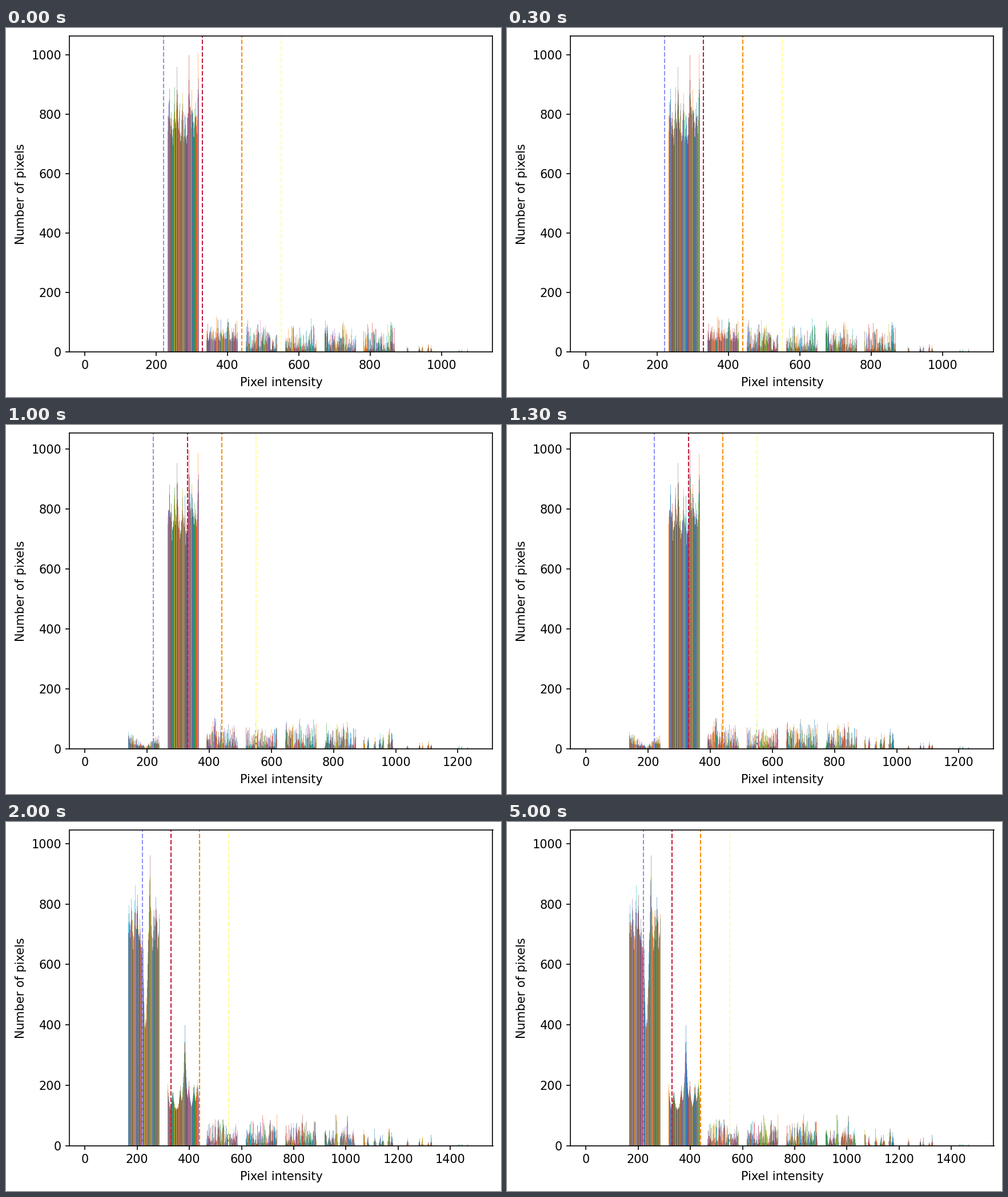
A matplotlib script that plays this animation: 867 by 646 pixels, repeating every 7000 ms.

```python
import numpy as np
import matplotlib.pyplot as plt
from matplotlib.animation import FuncAnimation
from matplotlib.colors import to_rgb

W, H, DPI = 867, 646, 128          # a power of two keeps the pixel size exact
S = 149.4 / DPI                    # scale of point sizes
AX_W, AX_H, AX_BOTTOM = 741, 552.6, 79.1
BIN = AX_W / 10.78                 # pixels per histogram bin
GROUP = 55                         # pixels per group of bars (0.8 bin)
SUB = np.arange(2 * GROUP) / 2     # half-pixel columns within a group
TAB10 = np.array([to_rgb(f"C{i}") for i in range(10)])
THRESHOLDS = {220: "#9191f8", 330: "#c01a3c", 440: "#fa8c05", 550: "#ffff99"}

plt.rcParams.update({
    "font.family": "DejaVu Sans", "font.size": 10 * S,
    "axes.linewidth": 0.8 * S, "axes.labelpad": 4 * S,
    "xtick.major.size": 3.5 * S, "ytick.major.size": 3.5 * S,
    "xtick.major.width": 0.8 * S, "ytick.major.width": 0.8 * S,
    "xtick.major.pad": 3.5 * S, "ytick.major.pad": 3.5 * S,
})


def tower(base, peaks, dip=0.0, spread=1.6):
    """Tall group: a rippled base with sharp peaks and an optional valley."""
    def make(rng):
        h = base * (1.04 + 0.09 * np.sin(1.3 * SUB))
        h *= rng.uniform(0.93, 1.07, SUB.size)
        for x, top in peaks:
            rise = np.exp(-np.abs(SUB - x) / spread)
            h = np.maximum(h, base + (top - base) * rise)
        h *= 1 - 0.06 * rng.random(SUB.size) ** 2
        return h * (1 - dip * np.exp(-((SUB - 30) / 3.5) ** 2))
    return make


def dense(low=6, high=118):
    """Low group of irregular spikes."""
    def make(rng):
        swell = np.interp(SUB, np.linspace(0, GROUP, 23), rng.uniform(0.35, 1, 23))
        return low + (high - low) * swell * rng.random(SUB.size) ** 1.2
    return make


def sparse(index):
    """Thinning group: fewer and lower clusters towards the last bin."""
    places = [44.5, 29, 34, 49.5, 8, 20, 1, 14, 40]
    rest = 10 - index

    def make(rng):
        h = np.zeros(SUB.size)
        for x in places[:2 * rest + 1]:
            top = 14.5 * rest ** 1.5 * rng.uniform(0.5, 1)
            bump = np.clip(1.2 - np.abs(SUB - x) / (0.4 + 0.6 * rest), 0, 1)
            h = np.maximum(h, top * bump * rng.uniform(0.3, 1, SUB.size))
        return h
    return make


def fading(start):
    """Low group that falls to almost nothing and partly returns."""
    def make(rng):
        base = start * np.abs(1 - SUB / 30) ** 0.8 + 5
        return base * rng.uniform(0.3, 1, SUB.size)
    return make


def scene(bin_width, top, groups, thin, left=111.5, y_step=200):
    low = {i: sparse(i) if i >= thin else dense() for i in range(3, 10)}
    return dict(bin=bin_width, top=top, left=left, y_step=y_step, groups={**low, **groups})


SKYLINE = tower(715, [(3, 900), (12, 900), (16.5, 960), (26, 890), (37.5, 1000),
                      (42.5, 905), (47.5, 830), (53.5, 1005)])

SCENES = [
    scene(110.1, 1062.6, {2: SKYLINE, 3: dense(35, 140)}, thin=8),
    scene(126.7, 1065, {1: fading(38), 2: SKYLINE}, thin=7),
    scene(126.3, 1053.4, {1: fading(55), 2: SKYLINE}, thin=7),
    scene(140.6, 753.2, {
        1: tower(410, [(0, 535), (4.5, 583), (11.5, 643), (17.5, 588), (37.5, 567),
                       (48.5, 550), (53, 540)], dip=0.62),
        2: tower(335, [(4, 417), (25, 560), (27, 717), (31.5, 625), (38.5, 497),
                       (43, 440), (51, 447), (54.5, 465)])},
        thin=6, left=98, y_step=100),
    scene(150.4, 1044.5, {
        1: tower(665, [(1.5, 810), (5.5, 835), (12, 870), (16, 845), (38, 987),
                       (48, 825), (54.5, 785)], dip=0.45),
        2: tower(112, [(0, 205), (9, 190), (22, 200), (30, 400), (37, 215),
                       (46, 210), (52, 228)], spread=2.8)},
        thin=6),
]


def group_colors(index):
    """Colours belong to a column, so they stay the same in every scene."""
    rng = np.random.default_rng(index)
    return TAB10[(10 * rng.random(SUB.size) ** 1.4).astype(int)]


def draw_bars(ax, index, heights, zero, unit):
    """Merge pairs of half-pixel bars into one-pixel columns."""
    start = round(zero + BIN * (index + 0.1))
    x = (start + np.arange(GROUP) + 0.2 - zero) / unit
    pairs = heights.reshape(GROUP, 2)
    tints = group_colors(index).reshape(GROUP, 2, 3)
    taller = tints[np.arange(GROUP), pairs.argmax(axis=1)]
    layers = ((pairs.max(axis=1), (taller + 1) / 2),
              (pairs.min(axis=1), tints.mean(axis=1)))
    for tops, shades in layers:
        shown = tops > 0
        ax.vlines(x[shown], 0, tops[shown], colors=shades[shown],
                  linewidth=72 / DPI, snap=True, zorder=1)


fig = plt.figure(figsize=(W / DPI, H / DPI), dpi=DPI, facecolor="white")
ax = fig.add_axes([0.1, 0.1, 0.8, 0.8])


def update(frame):
    number = min(frame, len(SCENES) - 1)
    now = SCENES[number]
    left, width = now["left"], now["bin"]
    zero, unit = left + 0.39 * BIN, BIN / width
    rng = np.random.default_rng(20 + number)

    ax.clear()
    ax.set_position([left / W, AX_BOTTOM / H, AX_W / W, AX_H / H])
    for index, make in now["groups"].items():
        draw_bars(ax, index, make(rng), zero, unit)
    for value, color in THRESHOLDS.items():
        ax.axvline(value, color=color, linestyle="--", linewidth=S)

    ax.set_xticks(np.arange(0, 10.39 * width, 200))
    ax.set_yticks(np.arange(0, now["top"], now["y_step"]))
    ax.set_xlim(-0.39 * width, 10.39 * width)
    ax.set_ylim(0, now["top"])
    ax.set_xlabel("Pixel intensity", labelpad=4.4 * S)
    ax.set_ylabel("Number of pixels")
    return []


anim = FuncAnimation(fig, update, frames=14, interval=500, repeat=True, repeat_delay=0)
plt.show()
```
